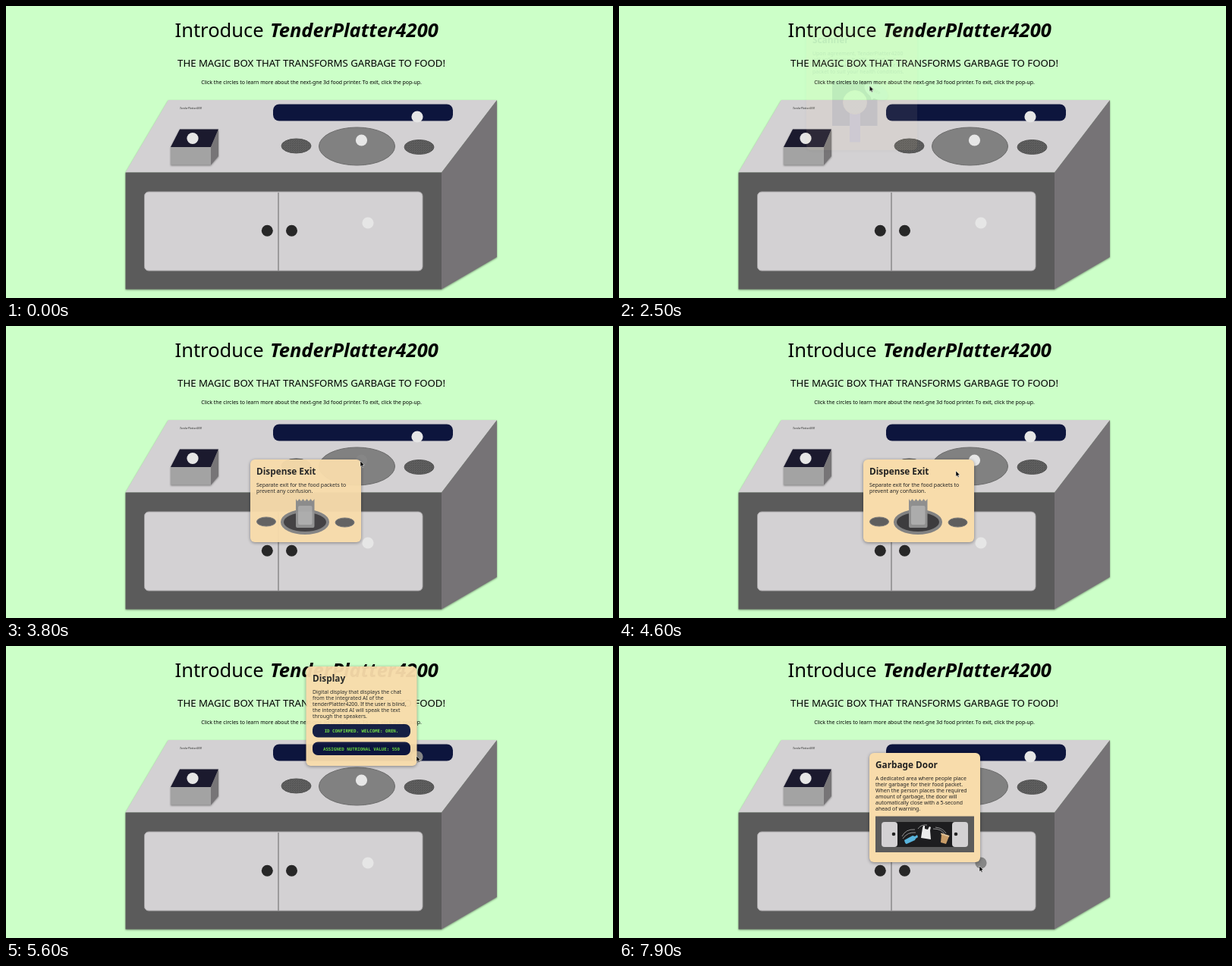
Animation, 800 px wide and 385 px high, one loop 8000 ms. Source, as an HTML page without scripts:

```html
<!DOCTYPE html>
<html lang="en">
<head>
<meta charset="utf-8">
<title>Food printer tour</title>
<style>
  html, body { margin: 0; width: 100%; height: 100%; overflow: hidden; background: #ccffc8; }
  svg { display: block; width: 800px; height: 385px; font-family: "Noto Sans", sans-serif; }
  .brand { font-weight: 700; font-style: italic; }
  .soft { filter: drop-shadow(0 1px 1px #0006); }

  .card { opacity: 0; fill: #222; filter: drop-shadow(0 1px 2px #0006); animation: 8s ease-out infinite; }
  .card > .paper { fill: #f8dcab; }
  .card .head { font-size: 11.8px; font-weight: 700; }
  .card .body { font-size: 6.95px; }
  .led { font: 700 5.8px "DejaVu Sans Mono", monospace; fill: #70e040; text-anchor: middle; }

  .spot { fill: #e6e6e6; animation: 8s step-end infinite; }
  .cursor { animation: move 8s ease-in-out infinite; }

  #scanner { animation-name: scanner; }
  #dispense { animation-name: dispense; }
  #display { animation-name: display; }
  #door { animation-name: door; }
  @keyframes scanner  { 0%, 12.65% { opacity: 0 } 15.5%, 29.1% { opacity: 1 } 31.9%, 100% { opacity: 0 } }
  @keyframes dispense { 0%, 45.15% { opacity: 0 } 48%, 58.9% { opacity: 1 } 61.7%, 100% { opacity: 0 } }
  @keyframes display  { 0%, 67.6% { opacity: 0 } 70.5%, 82.6% { opacity: 1 } 85.4%, 100% { opacity: 0 } }
  @keyframes door     { 0%, 95.1% { opacity: 0 } 98%, 100% { opacity: 1 } }

  #spot1 { animation-name: hover1; }
  #spot2 { animation-name: hover2; }
  #spot3 { animation-name: hover3; }
  #spot4 { animation-name: hover4; }
  @keyframes hover1 { 10.5% { fill: #868686 } 20% { fill: #e6e6e6 } }
  @keyframes hover2 { 42.5% { fill: #868686 } 51.5% { fill: #e6e6e6 } }
  @keyframes hover3 { 65% { fill: #868686 } 76.5% { fill: #e6e6e6 } }
  @keyframes hover4 { 93% { fill: #868686 } 100% { fill: #868686 } }

  @keyframes move {
    0%, 4.9% { transform: translate(400px, 230px); opacity: 0; animation-timing-function: step-end; }
    5% { transform: translate(400px, 230px); opacity: 1; }
    11.25%, 18% { transform: translate(244px, 177px); opacity: 1; }
    27%, 31% { transform: translate(330px, 105px); }
    38.75% { transform: translate(458px, 165px); }
    43.75%, 49% { transform: translate(467px, 178px); }
    57.5%, 59.5% { transform: translate(444px, 191px); }
    65.6%, 75% { transform: translate(541px, 145px); animation-timing-function: ease-in; }
    78.75% { transform: translate(538px, 104px); animation-timing-function: ease-out; }
    81.25%, 85.6% { transform: translate(514px, 47px); }
    93.75%, 100% { transform: translate(475px, 290px); opacity: 1; }
  }
</style>
</head>
<body>
<svg viewBox="0 0 800 385">
  <defs>
    <pattern id="mesh" width="3" height="3" patternUnits="userSpaceOnUse">
      <path d="M0 0h3v3H0z" fill="#5e5e5e"/>
      <path d="M0 0h1v1H0zM2 1h1v1H2z" fill="#505050"/>
    </pattern>
    <pattern id="dots" width="4" height="4" patternUnits="userSpaceOnUse">
      <path d="M0 0h4v4H0z" fill="#f3e2a4"/>
      <path d="M0 0h1v1H0zM2 2h1v1H2z" fill="#cfe0a4"/>
    </pattern>
  </defs>

  <text x="222.5" y="41" font-size="25.5">Introduce</text>
  <text x="348" y="41" font-size="25.5" class="brand">TenderPlatter4200</text>
  <text x="402.5" y="80" font-size="13.2" text-anchor="middle">THE MAGIC BOX THAT TRANSFORMS GARBAGE TO FOOD!</text>
  <text x="402.5" y="102.5" font-size="6.91" text-anchor="middle">Click the circles to learn more about the next-gne 3d food printer. To exit, click the pop-up.</text>

  <!-- Machine body -->
  <g class="soft">
    <path d="M214 124H647L574 219.5H157.500z" fill="#d3d1d3"/>
    <path d="M647 124V331L574 373.500V219.500z" fill="#767376"/>
    <path d="M157.500 219.500H574V373.500H157.500z" fill="#5b5b5b"/>
  </g>
  <text x="229" y="135.500" font-size="3.35" class="brand" fill="#666">TenderPlatter4200</text>
  <rect x="352" y="129.500" width="237" height="22" rx="8" fill="#0d153d"/>
  <ellipse cx="462.500" cy="185" rx="50" ry="25" fill="#818181" stroke="#6c6c6c"/>
  <g fill="url(#mesh)" stroke="#555">
    <ellipse cx="382.500" cy="184.500" rx="19.500" ry="9.500"/>
    <ellipse cx="544.500" cy="186" rx="19.500" ry="9.500"/>
  </g>
  <g class="soft">
    <path d="M229 162.500H280L270 186H217z" fill="#1b1a2e"/>
    <path d="M217 186H270V209.500H217z" fill="#a3a3a3"/>
    <path d="M280 162.500V198L270 209.500V186z" fill="#777577"/>
  </g>
  <rect x="182.500" y="245" width="366.500" height="104" rx="5.500" fill="#d3d1d3" stroke="#aaa8aa"/>
  <path d="M359 246V349" stroke="#8a888a" stroke-width="1.500"/>
  <g fill="#272727">
    <circle cx="344.300" cy="296.300" r="7.500"/>
    <circle cx="376.500" cy="296.300" r="7.500"/>
  </g>

  <circle id="spot1" class="spot" cx="246" cy="174.500" r="7.600"/>
  <circle id="spot2" class="spot" cx="468.500" cy="177" r="7.600"/>
  <circle id="spot3" class="spot" cx="542" cy="146" r="7.600"/>
  <circle id="spot4" class="spot" cx="477" cy="286" r="7.600"/>

  <g transform="translate(247 29)"><g id="scanner" class="card">
    <rect class="paper" width="146" height="161" rx="6"/>
    <text class="head" x="8" y="20">Scanner</text>
    <text class="body" y="36">
      <tspan x="8">Upon agreement, TenderPlatter4200</tspan>
      <tspan x="8" dy="8">will collect your health record and</tspan>
      <tspan x="8" dy="8">customize the nutritional value of the</tspan>
      <tspan x="8" dy="8">packet to suit your health conditions.</tspan>
    </text>
    <path d="M34 69.500h59.500v59.500H34z" fill="#1b1a2e"/>
    <path d="M57 110h14v40.500H57z" fill="#9370c8"/>
    <circle cx="64" cy="98" r="15.500" fill="url(#dots)" stroke="#f4c98a"/>
    <g fill="#cbcbcb" class="soft">
      <path d="M82 84l4 11 6-5z"/>
      <ellipse cx="92" cy="83.500" rx="17" ry="9.500" transform="rotate(30 92 83.500)"/>
    </g>
    <text x="92" y="85.500" font-size="5" text-anchor="middle" transform="rotate(30 92 83.500)">BEEP</text>
  </g></g>

  <g transform="translate(322 176)"><g id="dispense" class="card">
    <rect class="paper" width="146" height="109" rx="6"/>
    <text class="head" x="8" y="19.500">Dispense Exit</text>
    <text class="body" y="35.500">
      <tspan x="8">Separate exit for the food packets to</tspan>
      <tspan x="8" dy="8">prevent any confusion.</tspan>
    </text>
    <g fill="#5e5e5e" stroke="#777">
      <ellipse cx="21" cy="82" rx="12.500" ry="6"/>
      <ellipse cx="124.500" cy="83" rx="12.500" ry="6"/>
    </g>
    <ellipse cx="72" cy="82.500" rx="30" ry="14.500" fill="#3d3c3e" stroke="#828282" stroke-width="4"/>
    <path d="M60 88V52l2 3 2.500-3 2.500 3 2.500-3 2.500 3 2.500-3 2.500 3 2.500-3 2.500 3 2.500-3V88q0 2-2 2H62q-2 0-2-2z" fill="#8f8f8f"/>
    <rect x="63" y="61" width="18.500" height="25" rx="2" fill="#acacac"/>
  </g></g>

  <g transform="translate(395.5 27)"><g id="display" class="card">
    <rect class="paper" width="146" height="131" rx="6"/>
    <text class="head" x="8.500" y="20">Display</text>
    <text class="body" y="36">
      <tspan x="8.500">Digital display that displays the chat</tspan>
      <tspan x="8.500" dy="8">from the integrated AI of the</tspan>
      <tspan x="8.500" dy="8">tenderPlatter4200. If the user is blind,</tspan>
      <tspan x="8.500" dy="8">the integrated AI will speak the text</tspan>
      <tspan x="8.500" dy="8">through the speakers.</tspan>
    </text>
    <g fill="#0d153d">
      <rect x="8.500" y="76" width="129" height="17.500" rx="7"/>
      <rect x="8.500" y="99.500" width="129" height="17.500" rx="7"/>
    </g>
    <text class="led" x="73" y="87">ID CONFIRMED. WELCOME: OREN.</text>
    <text class="led" x="73" y="110.500">ASSIGNED NUTRIONAL VALUE: 550</text>
  </g></g>

  <g transform="translate(330 141)"><g id="door" class="card">
    <rect class="paper" width="146" height="144" rx="6"/>
    <text class="head" x="8" y="20">Garbage Door</text>
    <text class="body" y="36">
      <tspan x="8">A dedicated area where people place</tspan>
      <tspan x="8" dy="7.9">their garbage for their food packet.</tspan>
      <tspan x="8" dy="7.9">When the person places the required</tspan>
      <tspan x="8" dy="7.9">amount of garbage, the door will</tspan>
      <tspan x="8" dy="7.9">automatically close with a 5-second</tspan>
      <tspan x="8" dy="7.9">ahead of warning.</tspan>
    </text>
    <path d="M8 83.500h130v47.500H8z" fill="#5b5b5b"/>
    <path d="M34 91h78v33H34z" fill="#1d1d1f"/>
    <g fill="#d3d1d3">
      <rect x="16" y="91" width="21" height="33" rx="4"/>
      <rect x="109" y="91" width="21" height="33" rx="4"/>
    </g>
    <circle cx="32" cy="107" r="2.300"/>
    <circle cx="114" cy="107" r="2.300"/>
    <g fill="none" stroke="#ddd" stroke-width=".6">
      <path d="M43 110q5-10 17-9M44 113q6-9 17-8M64 100q4-6 12-5M84 100q11 0 15 7M87 98q10 1 14 8"/>
    </g>
    <path d="M46 115l11-6 3 1 3-2 1 3-3 2-1 2-11 5q-2 0-3-5z" fill="#58b4dc"/>
    <path d="M70 99l1-3 2 0 0 4 4 1 2-4 2 1-1 4 1 12-13-2z" fill="#ebebeb"/>
    <path d="M95 107l10 3-4 10-7-2z" fill="#c99d68"/>
    <path d="M94.500 105.500l11 3.500-.5 1.700-11-3.500z" fill="#e2c49a"/>
  </g></g>

  <path class="cursor" d="M0 0V7.500L1.700 6 2.900 8.600 4.100 8 3 5.500H5.300z" stroke="#fff" stroke-width=".5"/>
</svg>
</body>
</html>
```
